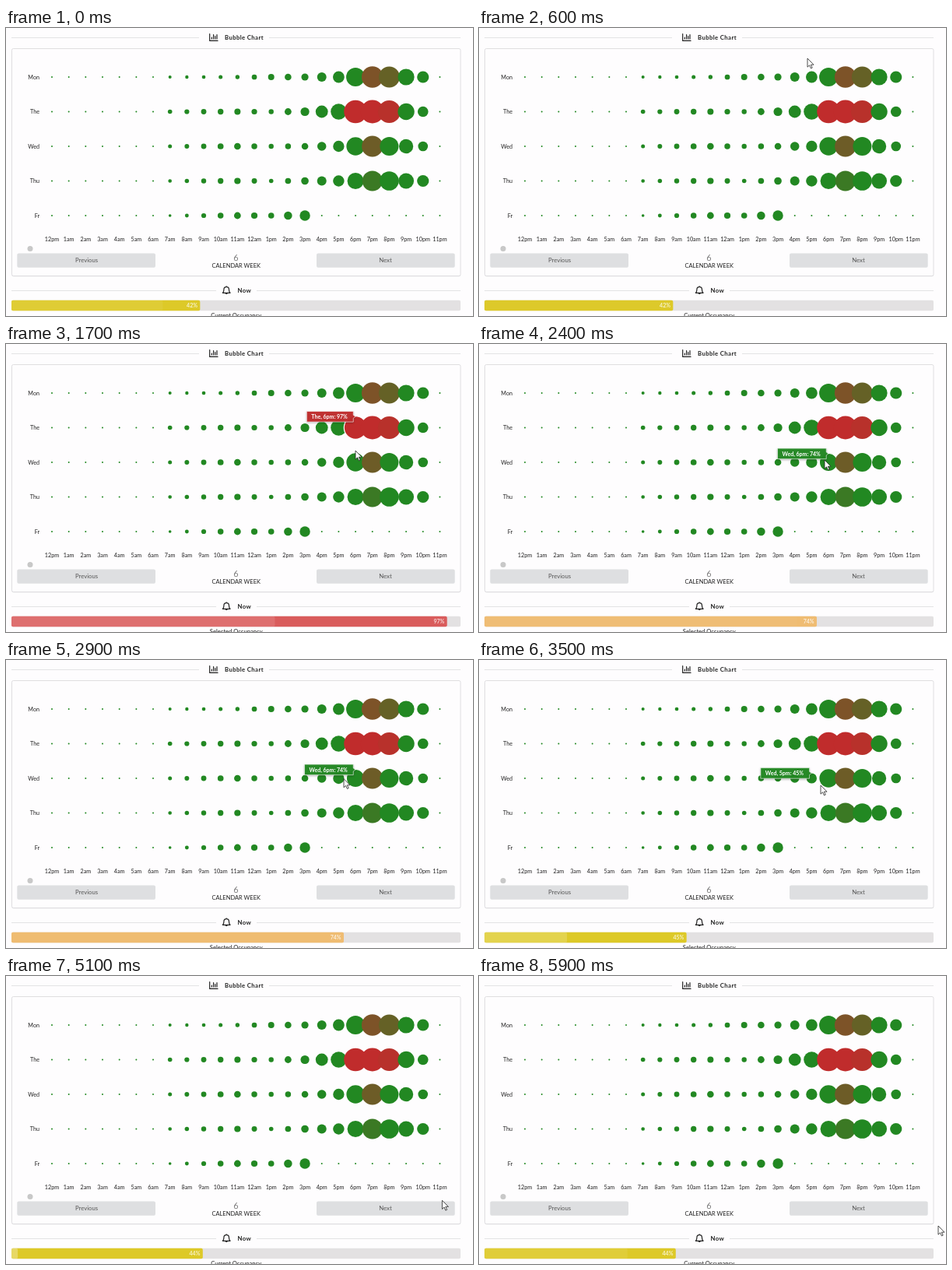
An HTML page that plays this animation: 600x370 px, repeating every 6 s.

```html
<!DOCTYPE html>
<html lang="en">
<head>
<meta charset="utf-8">
<title>Bubble Chart</title>
<style>
  html, body { margin: 0; width: 100%; height: 100%; overflow: hidden; background: #fefdfe; }
  svg { display: block; width: 600px; height: 370px; font: 7.2px Lato, sans-serif; fill: #222; }
  .bold { font-weight: 700; }
  .title { font-size: 7.74px; font-weight: 700; letter-spacing: .39px; }
  .mid { text-anchor: middle; }
  .end { text-anchor: end; }
  .rule { stroke: #e3e3e4; }
  .icon { fill: none; stroke: #222; stroke-width: 1.2; stroke-linecap: round; stroke-linejoin: round; }
  .button { fill: #dedfe1; }
</style>
</head>
<body>
<svg viewBox="0 0 600 370">
  <path class="rule" d="M7 12.5H248M338 12.5H584M7 337.5H270M322 337.5H584"/>
  <path class="icon" d="M261.7 7.5V16.4H272M264.4 14V12M266.6 14V8.5M268.8 14V10.5M271 14V8.5"/>
  <text class="title" x="281" y="14.6">Bubble Chart</text>

  <rect x="7.5" y="27" width="576.5" height="292.3" rx="2" fill="#dcdcde"/>
  <rect x="7.5" y="26.5" width="576.5" height="292" rx="2" fill="#fefdfe" stroke="#dfdee0"/>
  <g id="chart"></g>
  <circle cx="31" cy="283.5" r="3.5" fill="#c8c8c8"/>

  <rect class="button" x="14.3" y="289.5" width="177.7" height="18.2" rx="2"/>
  <rect class="button" x="399" y="289.5" width="177.7" height="18.2" rx="2"/>
  <g class="mid" font-size="7.74" fill="#555">
    <text x="103.5" y="301.4">Previous</text>
    <text x="487.5" y="301.4">Next</text>
  </g>
  <text class="mid" x="295.5" y="299.2" font-size="11" font-weight="300">6</text>
  <text class="mid" x="295.7" y="307.8" font-size="7.5">CALENDAR WEEK</text>

  <path class="icon" d="M278.4 340.3C280 339 279.8 337.5 279.9 336A3.3 3.3 0 0 1 286.5 336C286.6 337.5 286.4 339 288 340.3ZM283.2 332.6V331.8M281.9 340.6A1.4 1.4 0 0 0 284.5 340.6"/>
  <text class="title" x="297.5" y="339.5">Now</text>

  <rect x="7" y="349.8" width="577" height="13.5" rx="2" fill="#e3e1e2"/>
  <rect id="bar" x="7" y="349.8" height="13.5" rx="2"/>
  <rect id="pulse" x="7" y="349.8" height="13.5" rx="2" fill="#fff"/>
  <text id="percent" class="end bold" y="359.2" font-size="7" fill="#fff" fill-opacity=".75"></text>
  <text id="caption" class="mid" x="295.7" y="371.6" font-size="7.6"></text>

  <g id="tip">
    <path id="tipBox" stroke="#fff" stroke-opacity=".75" stroke-width=".8" fill-opacity=".96"
      style="filter: drop-shadow(0 1px 1px rgba(0,0,0,.3))"/>
    <text id="tipText" class="end bold" font-size="7" fill="#fff"></text>
  </g>
  <path id="cursor" d="M0 0V11.2L2.6 8.8L4.4 12.9L6.2 12.1L4.4 8.2H8Z" fill="#fff" stroke="#222" stroke-width=".8"/>
</svg>
<script>
const LOOP = 6000, STEP = 100, PULSE = 2000, BAR_X = 7, BAR_W = 577;
const $ = id => document.getElementById(id);
const set = (el, attrs) => { for (const k in attrs) el.setAttribute(k, attrs[k]); return el; };
const add = (tag, attrs, text = '') => {
  const el = set(document.createElementNS('http://www.w3.org/2000/svg', tag), attrs);
  el.textContent = text;
  return $('chart').appendChild(el);
};
const clamp = v => Math.max(0, Math.min(1, v));

// Linear interpolation through key points; undefined outside their range.
const along = (keys, values, at) => {
  const i = keys.findIndex(k => k >= at);
  if (i < 0 || values[i] === undefined || at < keys[0]) return undefined;
  if (i === 0) return values[0];
  const k = (at - keys[i - 1]) / (keys[i] - keys[i - 1]);
  return values[i - 1] + (values[i] - values[i - 1]) * k;
};

// Bubble radii at the key hours; hours outside them are dots.
const keyHours = [7, 11, 13, 15, 17, 18, 19, 20, 22];
const days = {
  Mon: [2, 2.7, 4, 4.6, 7.4, 12, 13.8, 13.5, 7.6],
  The: [2.8, 4, 3.2, 5.6, 10.2, 14.8, 15, 14.5, 6.8],
  Wed: [2.5, 4.3, 3.2, 4.3, 7.2, 11.7, 13.6, 12, 6.3],
  Thu: [2.3, 4.1, 2.8, 4.8, 7.2, 10.5, 13, 12.3, 7.6],
  Fr: [1.8, 4.4, 3.8, 6.7]
};
const names = Object.keys(days);
const colX = hour => 59 + hour * 21.67;
const heat = r => {
  const k = clamp((r - 12.7) / 1.9);
  const mix = (a, b) => Math.round(a + (b - a) * k);
  return `rgb(${mix(34, 192)},${mix(136, 44)},${mix(34, 44)})`;
};

const bubbles = names.map((name, row) => {
  const y = 63 + row * 44.5;
  add('text', { class: 'end', x: 43, y: y + 2.6 }, name);
  return Array.from({ length: 24 }, (_, hour) => {
    const r = along(keyHours, days[name], hour) || 1, x = colX(hour), color = heat(r);
    return { x, y, r, color, el: add('circle', { cx: x, cy: y, r, fill: color, 'stroke-width': 1.2 }) };
  });
});
for (let h = 0; h < 24; h++) {
  const half = h > 0 && h < 13 ? 'am' : 'pm';
  add('text', { class: 'mid', x: colX(h), y: 274.4 }, (h % 12 || 12) + half);
}

const states = [
  { at: 0, value: 42 },
  { at: 900, value: 97, row: 1, hour: 18 },
  { at: 2000, value: 74, row: 2, hour: 18 },
  { at: 3000, value: 45, row: 2, hour: 17 },
  { at: 3800, value: 82, row: 3, hour: 19 },
  { at: 4800, value: 42.6, label: '44%' }
];
const barColor = value => value > 90 ? '#d95c5c' : value > 60 ? '#efbc72' : '#ddc928';

const pointer = {
  t: [300, 600, 1200, 1700, 2400, 3100, 3500, 4200, 4900, 5900],
  x: [408, 422, 449, 449, 444, 430, 439, 467, 553, 590],
  y: [-2, 39, 108, 137, 149, 154, 161, 192, 280, 321]
};

// CSS "ease": cubic-bezier(.25, .1, .25, 1)
const ease = x => {
  const curve = (u, a, b) => 3 * u * (1 - u) ** 2 * a + 3 * u * u * (1 - u) * b + u ** 3;
  let lo = 0, hi = 1;
  for (let i = 0; i < 20; i++) {
    const mid = (lo + hi) / 2;
    if (curve(mid, .25, .25) < x) lo = mid; else hi = mid;
  }
  return curve(lo, .1, 1);
};

let lit;
function showTip({ row, hour, value }) {
  if (lit) lit.el.removeAttribute('stroke');
  lit = hour && bubbles[row][hour];
  $('tip').style.display = lit ? '' : 'none';
  if (!lit) return;
  lit.el.setAttribute('stroke', '#fff');
  const right = lit.x - 2.8, y = lit.y - lit.r + .6;
  const text = $('tipText');
  text.textContent = `${names[row]}, ${hour - 12}pm: ${value}%`;
  set(text, { x: right - 7.5, y: y + 2.8 });
  const left = right - text.getComputedTextLength() - 13.5;
  set($('tipBox'), {
    d: `M${left} ${y - 6.8}H${right}V${y - 2}L${lit.x} ${y}L${right} ${y + 2}V${y + 6.8}H${left}Z`,
    fill: lit.color
  });
}

function draw(now) {
  const t = Math.floor(now % LOOP / STEP) * STEP;
  const state = states.filter(s => s.at <= t).pop();
  showTip(state);

  const width = BAR_W * state.value / 100;
  const sweep = ease((t / PULSE + .5) % 1);
  set($('bar'), { width, fill: barColor(state.value) });
  set($('pulse'), { width: width * sweep, opacity: .3 * (1 - sweep) });
  set($('percent'), { x: BAR_X + width - 3.4 }).textContent = state.label || state.value + '%';
  $('caption').textContent = (lit ? 'Selected' : 'Current') + ' Occupancy';

  const x = along(pointer.t, pointer.x, t), y = along(pointer.t, pointer.y, t);
  $('cursor').style.display = x === undefined ? 'none' : '';
  if (x !== undefined) set($('cursor'), { transform: `translate(${x} ${y})` });
}

const start = performance.now();
function tick() {
  draw(performance.now() - start);
  requestAnimationFrame(tick);
}
tick();
</script>
</body>
</html>
```
